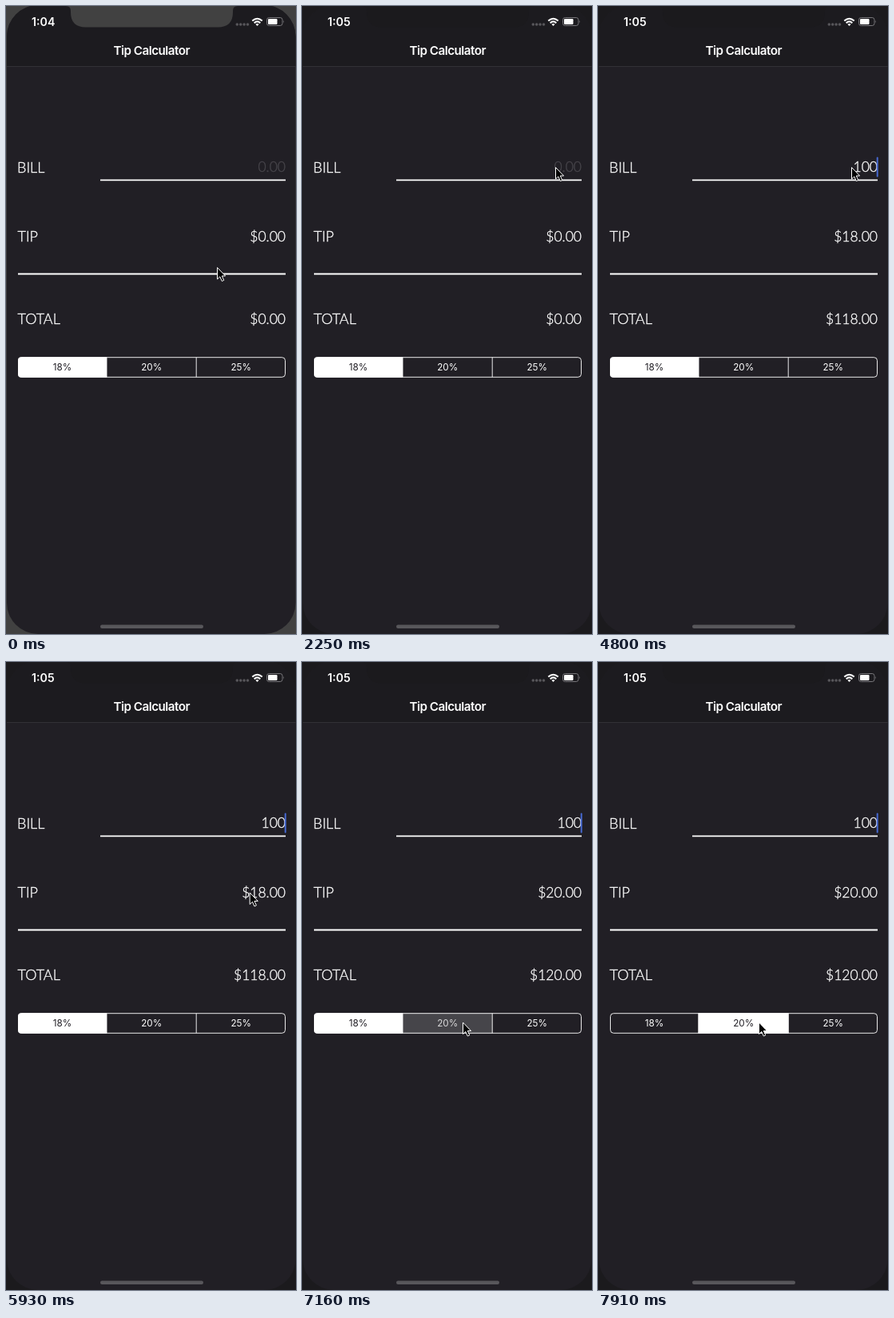
Animation of 363x784 px, one loop 8000 ms. Source, as an HTML page:

```html
<!DOCTYPE html>
<html lang="en">
<head>
<meta charset="utf-8">
<title>Tip Calculator</title>
<style>
  html, body { margin: 0; width: 100%; height: 100%; overflow: hidden; background: #1c1b1f; }
  svg { display: block; width: 363px; height: 784px; }
  text { fill: #fff; font-family: Inter, "Open Sans", sans-serif; }
  .label, .num { font: 300 18px Lato, "Open Sans", sans-serif; stroke: #fff; stroke-width: .35px; }
  .num { font-size: 17.5px; text-anchor: end; }
  .hint { fill: #47454b; stroke: #47454b; }
  .mid { text-anchor: middle; }
  .bold { font-weight: 600; }
</style>
</head>
<body>
<svg viewBox="0 0 363 784">
  <defs>
    <clipPath id="screen"><rect x="1" y="-1" width="361.5" height="785" rx="39"/></clipPath>
    <clipPath id="box"><rect x="15" y="438.2" width="335" height="25.6" rx="4"/></clipPath>
  </defs>

  <rect class="bezel" width="363" height="784"/>
  <g clip-path="url(#screen)">
    <rect width="363" height="784" fill="#211f25"/>
    <rect width="363" height="75" fill="#1c1b1f"/>
    <rect y="75" width="363" height="1" fill="#323136"/>
  </g>
  <path class="bezel" d="M75 0Q81 0 81 6V8Q81 26.5 100 26.5H265Q284 26.5 284 8V6Q284 0 290 0Z"/>

  <text id="clock" class="bold" x="32" y="25" font-size="14.2"></text>
  <text class="bold mid" x="182.3" y="61" font-size="15.2" letter-spacing="-.5">Tip Calculator</text>
  <path d="M289.3 23H303" stroke="#57565a" stroke-width="3.6" stroke-linecap="round" stroke-dasharray="0 4.4"/>
  <g fill="none" stroke="#fff" stroke-width="2">
    <path d="M308.3 18.6Q314.5 12.8 320.7 18.6M310.7 21.2Q314.5 17.6 318.3 21.2"/>
    <path d="M312.4 22.8Q314.5 21 316.6 22.8L314.5 25Z" fill="#fff" stroke="none"/>
  </g>
  <rect x="326.5" y="14.5" width="19.5" height="10" rx="2.8" fill="none" stroke="#77767a"/>
  <rect x="328" y="16" width="11.5" height="7" rx="1.3" fill="#fff"/>
  <path d="M347.3 17.8Q348.8 19.5 347.3 21.2Z" fill="#77767a"/>

  <text class="label" x="14" y="208">BILL</text>
  <text class="label" x="14.5" y="294">TIP</text>
  <text class="label" x="14.5" y="397">TOTAL</text>
  <path d="M118 217.4H350M15 334.5H350" stroke="#fff" stroke-width="1.9"/>
  <text id="bill" x="350" y="207"></text>
  <text id="tip" class="num" x="350" y="294"></text>
  <text id="total" class="num" x="350" y="397"></text>
  <rect id="caret" x="348.7" y="188.5" width="2" height="25" rx="1" fill="#4669d2"/>

  <g clip-path="url(#box)" fill="#fff">
    <rect class="seg" x="15" y="438" width="111" height="26"/>
    <rect class="seg" x="125.5" y="438" width="113" height="26"/>
  </g>
  <g fill="none" stroke="#fff" stroke-opacity=".9">
    <rect x="15.5" y="438.7" width="334" height="24.6" rx="4"/>
    <path d="M126 438.7V463.3M238.2 438.7V463.3"/>
  </g>
  <g class="mid" font-size="11.7">
    <text class="pct" x="70.5" y="455.2">18%</text>
    <text class="pct" x="182.2" y="455.2">20%</text>
    <text x="294.2" y="455.2">25%</text>
  </g>

  <rect x="118" y="772.5" width="129" height="4.5" rx="2.2" fill="#58575b"/>
  <path id="arrow" d="M.5 .5V15L3.8 11.9L6.3 17.5L8.7 16.4L6.3 11H10.6Z" fill="#000" stroke="#fff" stroke-linejoin="round"/>
</svg>
<script>
const LOOP = 8000, BLINK = 1000, FOCUS = 1500, SELECT = 7160;
const KEYS = [3090, 3440, 4800];
const MOVES = [
  { from: 50, to: 510, x: 300, y: 198.5 },
  { from: FOCUS, to: 1670, x: 317, y: 201 },
  { from: 5820, to: 6050, x: 291, y: 383.5 },
  { from: 6290, to: 6750, x: 201, y: 449.5 }
];

const $ = id => document.getElementById(id);
const all = name => [...document.querySelectorAll(name)];
const bezels = all('.bezel'), segs = all('.seg'), pcts = all('.pct');

const ramp = (t, from, to) => Math.min(1, Math.max(0, (t - from) / (to - from)));
const ease = p => p * p * (3 - 2 * p);
const money = v => '$' + v.toFixed(2);

function pointer(t) {
  let x = 264, y = 326;
  for (const m of MOVES) {
    const p = ease(ramp(t, m.from, m.to));
    x += (m.x - x) * p;
    y += (m.y - y) * p;
  }
  return [x, y];
}

// The caret shows at once on focus or a key press, then blinks with soft fades.
function caretAlpha(t, typed) {
  const age = t - (typed ? KEYS[typed - 1] : FOCUS);
  if (age < 0) return 0;
  const phase = age % BLINK;
  const fadeIn = age < BLINK ? 1 : ramp(phase, 0, 110);
  return fadeIn * (1 - ramp(phase, 560, 740));
}

function fillSegment(i, alpha) {
  const shade = [33, 31, 37].map(c => Math.round(255 + (c - 255) * alpha));
  segs[i].setAttribute('opacity', alpha);
  pcts[i].style.fill = `rgb(${shade})`;
}

function draw(t) {
  const typed = KEYS.filter(k => t >= k).length;
  const digits = '100'.slice(0, typed);
  const tip = digits * (t < SELECT ? .18 : .2);

  bezels.forEach(b => b.setAttribute('fill', t < 720 ? '#414141' : '#1b1a1d'));
  $('clock').textContent = t < 2080 ? '1:04' : '1:05';
  $('bill').textContent = digits || '0.00';
  $('bill').setAttribute('class', digits ? 'num' : 'num hint');
  $('tip').textContent = money(tip);
  $('total').textContent = money(+digits + tip);
  $('caret').setAttribute('opacity', caretAlpha(t, typed));

  const press = .17 * ramp(t, 6940, 7040);
  const swap = ramp(t, SELECT + 10, SELECT + 240);
  fillSegment(0, 1 - swap);
  fillSegment(1, press + (1 - press) * swap);
  $('arrow').setAttribute('transform', `translate(${pointer(t)})`);
}

const start = performance.now();
function tick() {
  draw((performance.now() - start) % LOOP);
  requestAnimationFrame(tick);
}
tick();
</script>
</body>
</html>
```
